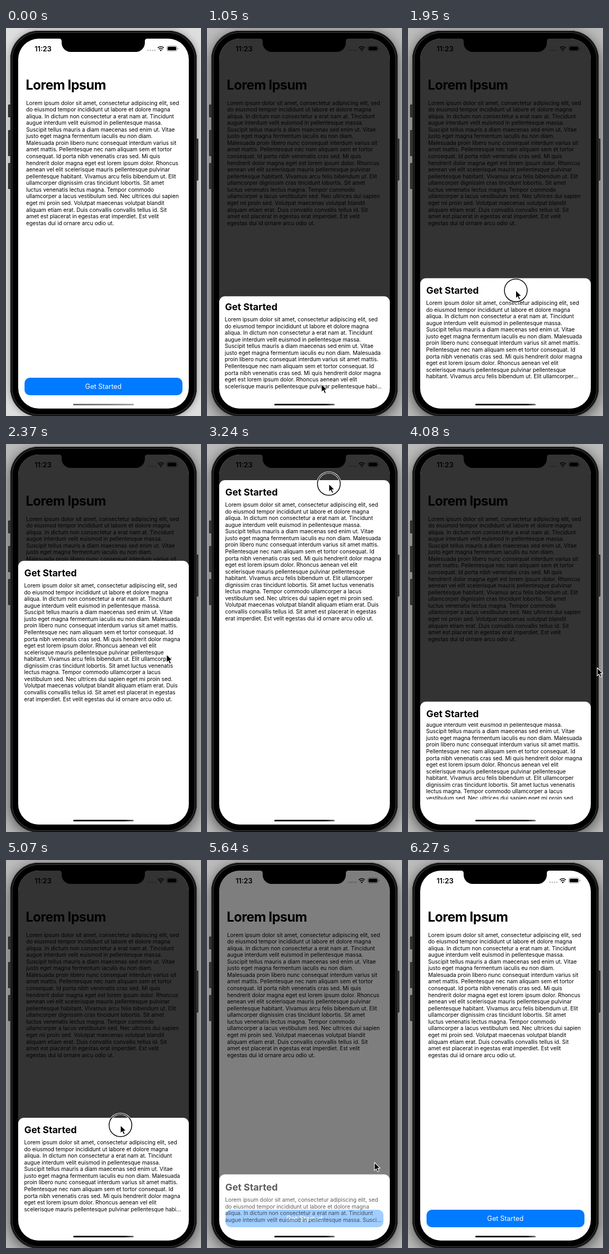
These frames come from a looping animation (368x730 px, 6.99 s). An HTML page:

```html
<!DOCTYPE html>
<html lang="en">
<head>
<meta charset="utf-8">
<title>Bottom sheet</title>
<style>
  html, body { margin: 0; width: 100%; height: 100%; overflow: hidden; }
  #stage {
    position: relative; width: 368px; height: 730px; overflow: hidden;
    background: #dedede; font-family: Inter, "Open Sans", sans-serif; color: #000;
  }
  #stage.active { background: #bcbcbc; }
  #stage div, #stage svg { position: absolute; }
  .key { background: #333; border-radius: 2px; box-shadow: inset 0 0 0 1px #1c1c1c; }
  #shade { left: 8px; top: 5px; width: 352px; height: 726px; border-radius: 54px;
    box-shadow: 0 0 14px rgba(0, 0, 0, .35); }
  .active #shade { box-shadow: 0 6px 26px rgba(0, 0, 0, .58); }
  #body {
    left: 8px; top: 5px; width: 352px; height: 726px; border-radius: 54px; background: #000;
    box-shadow: inset 0 0 0 1px #3c3c3c, inset 0 0 0 3px #0a0a0a, inset 0 0 0 4px #484848;
  }
  #screen {
    left: 23px; top: 20px; width: 322px; height: 696px;
    border-radius: 39px; background: #fff; overflow: hidden;
  }
  /* keeps stage coordinates inside the clipped screen */
  #view { left: -23px; top: -20px; width: 368px; height: 730px; }
  .text { font-size: 10.28px; line-height: 12.56px; white-space: pre; }
  #clock { left: 40px; width: 60px; top: 31px; text-align: center; font: 600 13.2px/16px Inter, sans-serif; }
  #heading { left: 37.2px; top: 92px; white-space: pre; font-weight: 700; font-size: 25px; line-height: 30px; letter-spacing: -.6px; }
  #article { left: 38px; top: 134.5px; }
  #dim { inset: 0; background: #000; }
  #sheet { left: 23px; width: 322px; height: 740px; top: 0; border-radius: 11px 11px 0 0; background: #fff; }
  #button {
    left: 35px; top: 658px; width: 297.5px; height: 33px; border-radius: 10px;
    background: #007aff; color: #fff; text-align: center; font-size: 12.8px; line-height: 33px;
  }
  #content { left: 34.2px; top: 0; width: 310px; height: 740px; }
  #title { left: .4px; top: 12px; white-space: pre; font-weight: 700; font-size: 17.8px; line-height: 22px; }
  #clip { left: 0; top: 40px; width: 311px; overflow: hidden; }
  #copy { left: 0; top: 0; }
  #bar { left: 126.5px; top: 706.8px; width: 114.5px; height: 3.6px; border-radius: 2px;
    background: linear-gradient(90deg, #000 82%, #777); }
  #barTint { inset: 0; border-radius: 2px; background: linear-gradient(90deg, #6c6c6c, #858585 60%, #a8a8a8); }
  #pointer { left: 0; top: 0; overflow: visible; }
</style>
</head>
<body>
<div id="stage">
  <div id="shade"></div>
  <div class="key" style="left:4px;top:144px;width:6px;height:24px"></div>
  <div class="key" style="left:4px;top:192px;width:6px;height:49px"></div>
  <div class="key" style="left:4px;top:254px;width:6px;height:49px"></div>
  <div class="key" style="left:357px;top:208px;width:6px;height:79px"></div>
  <div id="body"></div>
  <div id="screen"><div id="view">
    <div id="clock">11:23</div>
    <svg width="368" height="60" style="left:0;top:0">
      <g fill="#bdbdbd">
        <circle cx="268" cy="42" r="1.4"/><circle cx="272.3" cy="42" r="1.4"/>
        <circle cx="276.6" cy="42" r="1.4"/><circle cx="280.9" cy="42" r="1.4"/>
      </g>
      <g fill="none" stroke="#000" stroke-width="1.7">
        <path d="M286.4 37.4a8 8 0 0 1 11.4 0"/><path d="M288.5 39.8a5 5 0 0 1 7.2 0"/>
      </g>
      <path d="M290.2 41.7a2.7 2.7 0 0 1 3.8 0L292.1 43.7z"/>
      <rect x="303.6" y="33.8" width="19" height="9.6" rx="3" fill="none" stroke="#000" stroke-opacity=".42"/>
      <rect x="305" y="35.2" width="16.2" height="6.8" rx="1.8"/>
      <path d="M324 37q1.4 .5 1.4 1.6t-1.4 1.6z" opacity=".45"/>
    </svg>
    <div id="heading">Lorem Ipsum</div>
    <div id="article" class="text"></div>
    <div id="dim"></div>
    <div id="sheet"></div>
    <div id="button">Get Started</div>
    <div id="content">
      <div id="title">Get Started</div>
      <div id="clip"><div id="copy" class="text"></div></div>
    </div>
    <svg width="368" height="60" style="left:0;top:0">
      <path d="M100 19v1q5 0 5 5v3a17 17 0 0 0 17 17h123a17 17 0 0 0 17-17v-3q0-5 5-5v-1z"/>
    </svg>
    <div id="bar"><div id="barTint"></div></div>
  </div></div>
  <svg id="pointer" width="1" height="1">
    <g id="ring" fill="none">
      <circle r="21.5" stroke="#fff" stroke-width="3.4"/>
      <circle r="21.5" stroke="#000" stroke-width="1.5"/>
    </g>
    <path d="M0 0V15.2L3.5 11.9L6 17.6L8.6 16.5L6.1 10.9H10.9Z" stroke="#fff" stroke-width="1.1" stroke-linejoin="round"/>
  </svg>
</div>
<script>
const LOOP = 6990, STEP = 30, LINE = 12.56;
const HALF = 485, FULL = 68, LOW = 577, OFF = 735, FLOOR = 669;

// "|" breaks both texts, "<" only the article, ">" only the sheet
const prose = "Lorem ipsum dolor sit amet, consectetur adipiscing elit, sed|" +
  "do eiusmod tempor incididunt ut labore et dolore magna|" +
  "aliqua. In dictum non consectetur a erat nam at. Tincidunt|" +
  "augue interdum velit euismod in pellentesque massa.|" +
  "Suscipit tellus mauris a diam maecenas sed enim ut. Vitae|" +
  "justo eget magna fermentum iaculis eu non diam.<Malesuada>" +
  "proin libero nunc consequat interdum varius sit<amet mattis.>" +
  "Pellentesque nec nam aliquam sem et tortor<consequat. Id>" +
  "porta nibh venenatis cras sed. Mi quis<hendrerit dolor magna>" +
  "eget est lorem ipsum dolor. Rhoncus<aenean vel elit>" +
  "scelerisque mauris pellentesque pulvinar<pellentesque>" +
  "habitant. Vivamus arcu felis bibendum ut. Elit<ullamcorper>" +
  "dignissim cras tincidunt lobortis. Sit amet<luctus venenatis>" +
  "lectus magna. Tempor commodo<ullamcorper a lacus>" +
  "vestibulum sed. Nec ultrices dui sapien<eget mi proin sed.>" +
  "Volutpat maecenas volutpat blandit<aliquam etiam erat. Duis>" +
  "convallis convallis tellus id. Sit<amet est placerat in egestas>" +
  "erat imperdiet. Est velit<egestas dui id ornare arcu odio ut.";
const lines = prose.replace(/</g, " ").split(/[|>]/);

const el = {};
document.querySelectorAll("[id]").forEach(e => el[e.id] = e);
el.article.textContent = prose.replace(/>/g, " ").replace(/[|<]/g, "\n");

// pointer stops: time, x, y
const path = [
  [0, 228, 740], [30, 227, 726], [210, 216, 670], [1050, 216, 670], [1440, 190, 521],
  [1470, 189, 519], [1590, 189, 508], [1860, 189, 508], [2250, 296, 402], [2370, 303, 396],
  [2580, 288, 335], [3000, 230, 75], [3240, 230, 75], [3600, 280, 277], [3750, 280, 277],
  [4080, 357, 421], [4260, 213, 469], [4470, 213, 469], [4680, 214, 536], [4860, 216, 499],
  [5070, 216, 499], [5340, 285, 591], [5550, 285, 591], [5640, 316, 569], [6000, 352, 590],
  [6270, 385, 640], [LOOP, 385, 640]
];
const presses = [[750, 810], [1860, 2250], [3240, 3750], [5070, 5580]];

const clamp = v => Math.max(0, Math.min(1, v));
const ease = u => u * u * (3 - 2 * u);
// share of the way left for a critically damped spring
const rest = (ms, speed) => {
  const x = Math.max(0, ms) / 1000 * speed;
  return (1 + x) * Math.exp(-x);
};

function pointerAt(t) {
  const i = path.findIndex(p => p[0] > t);
  const [t0, x0, y0] = path[i - 1], [t1, x1, y1] = path[i];
  const u = ease((t - t0) / (t1 - t0));
  return [x0 + (x1 - x0) * u, y0 + (y1 - y0) * u];
}

function sheetTop(t, y) {
  if (t < 1860) return HALF + (OFF - HALF) * rest(t - 780, 15.5);
  if (t < 2250) return HALF + y - 508;
  if (t < 3240) return FULL + 311 * rest(t - 2250, 14.3);
  if (t < 3750) return FULL + y - 75;
  if (t < 5070) return HALF - 215 * rest(t - 3750, 28);
  if (t < 5580) return HALF + y - 499;
  return LOW + (OFF - LOW) * ease(clamp((t - 5550) / 480));
}

// 0 = sheet gone, 1 = sheet presented
function presence(t) {
  if (t < 5580) return clamp((t - 780) / 240);
  return Math.pow(1 - clamp((t - 5550) / 400), 1.8);
}

function truncated(n) {
  if (n >= lines.length) return lines.join("\n");
  const last = (lines[n - 1] + " " + lines[n]).slice(0, n > 10 ? 58 : 57).trimEnd();
  return [...lines.slice(0, n - 1), last + "..."].join("\n");
}

function layCopy(t, top) {
  const springing = t >= 2250 && t < 4260;
  const base = springing ? top : t < 1860 ? HALF : t >= 5580 ? LOW : top;
  const room = FLOOR - base - 40;
  const n = springing ? lines.length : Math.max(1, Math.min(lines.length, Math.floor(room / LINE)));
  const text = truncated(n);
  if (el.copy.textContent !== text) el.copy.textContent = text;
  el.clip.style.height = (springing ? room : n * LINE + 2) + "px";
  // text too tall for its frame stays centred while the sheet springs
  el.copy.style.top = (springing ? Math.min(0, (room - n * LINE) / 2) : 0) + "px";
}

function draw(t) {
  const [x, y] = pointerAt(t);
  const top = sheetTop(t, y), shown = presence(t);
  el.stage.className = t >= 750 ? "active" : "";
  el.barTint.style.opacity = 1 - clamp(t / 210);
  el.dim.style.opacity = .8 * shown;
  el.button.style.opacity = 1 - shown;
  el.content.style.opacity = shown;
  el.sheet.style.transform = `translateY(${top}px)`;
  const opening = t < 1860 ? Math.min(1, (top - HALF) / 21) : 0;
  const dy = t >= 5580 ? 1.3 : -3.4 * opening;
  el.content.style.transform = `translate(${-.7 * opening}px, ${top + dy}px)`;
  layCopy(t, top);
  el.pointer.style.transform = `translate(${x}px, ${y}px)`;
  el.ring.style.display = presses.some(([a, b]) => t >= a && t < b) ? "" : "none";
}

const start = performance.now();
function tick() {
  const t = Math.max(0, performance.now() - start) % LOOP;
  draw(Math.floor(t / STEP) * STEP);
  requestAnimationFrame(tick);
}
tick();
</script>
</body>
</html>
```
